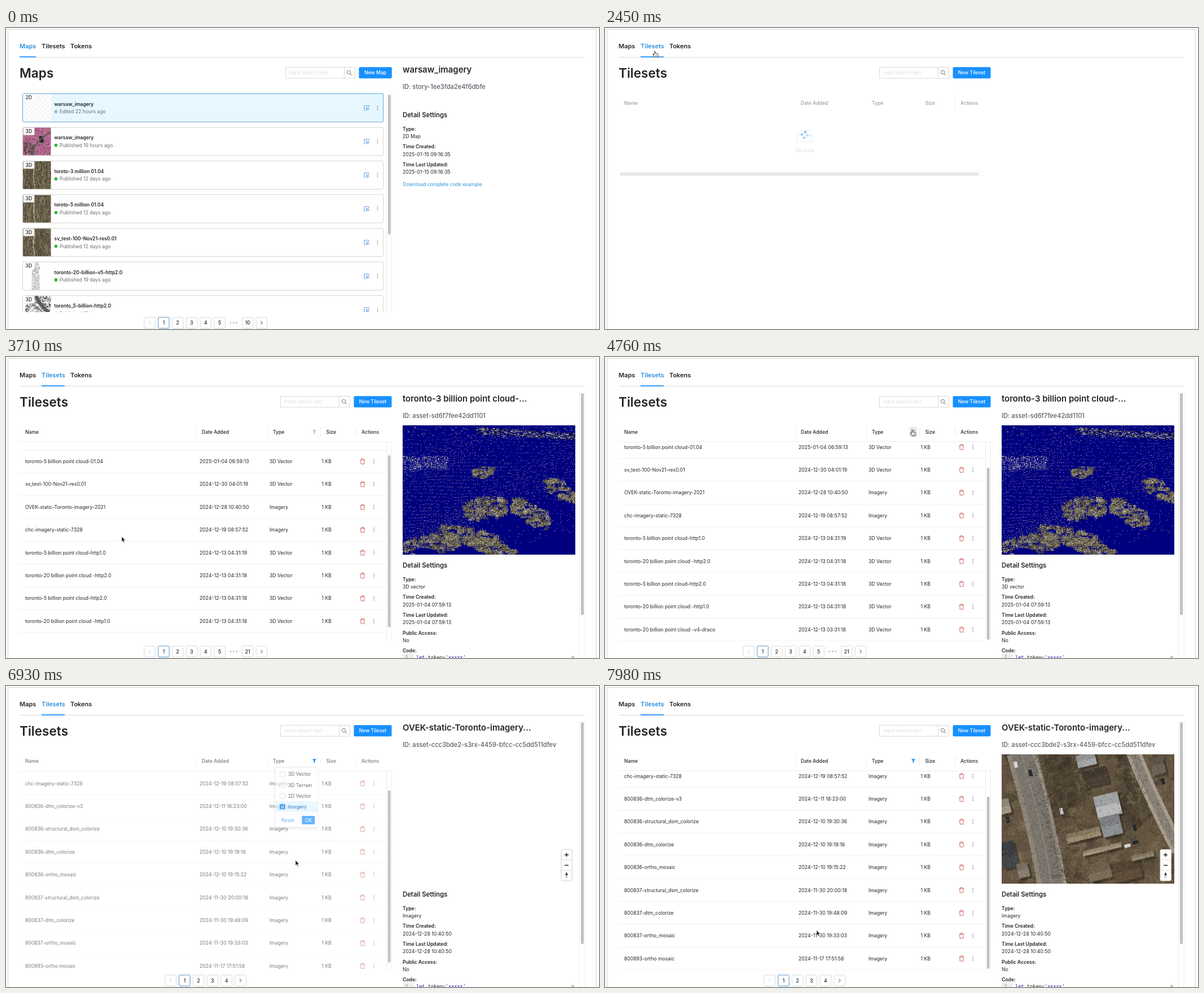
An HTML page with a canvas that plays this animation: 1051x533 px, repeating every 8 s.

```html
<!DOCTYPE html>
<html lang="en">
<head>
<meta charset="utf-8">
<title>Tilesets</title>
<style>
html, body { margin: 0; width: 1051px; height: 533px; overflow: hidden; background: #fff; }
canvas, svg { position: absolute; left: 0; top: 0; }
text { font-family: Inter, Roboto, sans-serif; white-space: pre; }
.mono { font-family: "DejaVu Sans Mono", "Noto Sans Mono", monospace; }
</style>
</head>
<body>
<canvas id="thumbs" width="90" height="503"></canvas>
<canvas id="cloud" width="306" height="229" style="left:703px;top:121px"></canvas>
<canvas id="aerial" width="306" height="229" style="left:703px;top:121px"></canvas>
<svg id="stage" width="1051" height="533" viewBox="0 0 1051 533"></svg>
<script>
const LOOP = 8000, STEP = 70;
const BLUE = '#1890ff', INK = '#242424', LINE = '#d9d9d9', FAINT = '#f0f0f0';
const $ = id => document.getElementById(id);

// ---- SVG helpers; text is placed by its vertical centre ----
const text = (x, y, s, { size = 8.6, weight = 400, fill = INK, anchor = 'start', cls = '' } = {}) =>
  `<text x="${x}" y="${y + size * .364}" font-size="${size}" font-weight="${weight}" fill="${fill}" text-anchor="${anchor}" class="${cls}">${s}</text>`;
const rect = (x, y, w, h, fill, stroke = 'none', r = 0) =>
  `<rect x="${x}" y="${y}" width="${w}" height="${h}" rx="${r}" fill="${fill}" stroke="${stroke}"/>`;
const path = (d, stroke, width = 1, fill = 'none') =>
  `<path d="${d}" stroke="${stroke}" stroke-width="${width}" fill="${fill}"/>`;
const dot = (x, y, r, fill, extra = '') => `<circle cx="${x}" cy="${y}" r="${r}" fill="${fill}" ${extra}/>`;
const group = (id, body) => `<g id="${id}">${body}</g>`;
const medium = { weight: 500 };

const more = (x, y) => [-3, 0, 3].map(d => dot(x, y + d, .75, '#555')).join('');
const trash = (x, y) => path(`M${x - 4.3} ${y - 2.7}h8.6M${x - 1.7} ${y - 3}v-1.6h3.4v1.6M${x - 3.3} ${y - 2.7}l.4 7.2h5.8l.4-7.2`, '#c4443c', .8);

function header(title, button, left, btnX, btnW) {
  return text(24, 79.5, title, { size: 22.6, weight: 600 }) +
    rect(left + .5, 69.5, 104, 19.5, '#fff', LINE) + rect(left + 104.5, 69.5, 19, 19.5, '#fff', LINE) +
    text(left + 7, 79.3, 'input search text', { fill: '#dcdcdc' }) +
    `<circle cx="${left + 112.6}" cy="78.4" r="3.2" fill="none" stroke="#666" stroke-width=".9"/>` +
    path(`M${left + 115} 80.8l3 3`, '#666', 1) +
    rect(btnX, 69.3, btnW, 20, BLUE, 'none', 1.8) +
    text(btnX + btnW / 2, 79.3, button, { fill: '#fff', anchor: 'middle', weight: 500 });
}

function pager(x, y, labels) {
  return labels.map((s, i) => {
    const cx = x + i * 24.8;
    if (s === '…') return [-5.5, 0, 5.5].map(d => dot(cx + d, y, 1.4, '#bfbfbf')).join('');
    const arrow = s === '<' || s === '>';
    return rect(cx - 9.7, y - 9.7, 19.4, 19.4, '#fff', s === '1' ? '#5b93c4' : LINE, 1.5) +
      (arrow ? path(s === '<' ? `M${cx + 1.5} ${y - 3}l-3 3 3 3` : `M${cx - 1.5} ${y - 3}l3 3-3 3`, s === '<' ? '#c4c4c4' : '#333')
        : text(cx, y, s, { anchor: 'middle', weight: 500, size: 8.7 }));
  }).join('');
}

function detail(title, id, top, fields) {
  let out = text(703, 74, title, { size: 14.9, weight: 600 }) +
    text(703, 103.5, 'ID: ' + id, { size: 11.1, weight: 500, fill: '#5a5f69' }) +
    text(703, top, 'Detail Settings', { size: 11.3, weight: 600 });
  fields.forEach(([label, value], i) => {
    const y = top + 25 + i * 31.7;
    out += text(703, y, label + ':', { weight: 600 }) + text(703, y + 13.3, value, { size: 8.7 });
  });
  return out;
}

function assetDetail(title, id, type, time) {
  return detail(title, id, 368.5, [['Type', type], ['Time Created', time], ['Time Last Updated', time], ['Public Access', 'No']]) +
    text(703, 520, 'Code:', { weight: 600 }) + rect(703, 526, 20, 8, '#eee') +
    text(708, 532, '1', { size: 8, fill: '#888', cls: 'mono' }) +
    `<text class="mono" x="727" y="535" font-size="8.6" fill="#222"><tspan fill="#1a1aa8">let</tspan> token=<tspan fill="#1a1aa8">'xxxxx'</tspan></text>` +
    dot(1004.5, 531.5, 2.6, '#c4c4c4') +
    path('M1016.5 62V533M1026 62V533', '#ececec') + rect(1019, 64, 5, 393, '#c1c1c1', 'none', 2.5);
}

// ---- maps page ----
const MAPS = [
  ['warsaw_imagery', 'Edited 22 hours ago'], ['warsaw_imagery', 'Published 19 hours ago'],
  ['toroto-3 million 01.04', 'Published 12 days ago'], ['toroto-5 million 01.04', 'Published 12 days ago'],
  ['sv_test-100-Nov21-res0.01', 'Published 12 days ago'], ['toronto-20-billion-v5-http2.0', 'Published 19 days ago'],
  ['toronto_5-billion-http2.0', 'Published 19 days ago']];
const mapRow = ([name, status], i) => {
  const y = 116 + i * 59.6, first = !i;
  return (first ? rect(80, y, 589, 50, '#e6f7ff') : '') +
    rect(29.5, y + .3, 639.3, 50, 'none', first ? '#5aa5d8' : '#d3d3d3', 2) +
    rect(30.5, y + 1, 20, 13, '#fffffff0') + text(34.5, y + 7.3, first ? '2D' : '3D', medium) +
    text(85.5, y + 18.5, name, { weight: 600, size: 8.5 }) + dot(88.5, y + 32, 2.9, first ? '#a3b6c4' : '#35b83c') +
    text(95, y + 32, status, { fill: '#686c73', size: 8.6 }) +
    path(`M643 ${y + 24}v-2.5h-8v8h2.8M638.3 ${y + 24.5}l5 1.8-2.1 1 2 2.2M638.3 ${y + 24.5}l1.6 5 1.2-2.2`, '#4a90d9', .9) +
    more(658.5, y + 25.3);
};
const mapsPage = header('Maps', 'New Map', 495, 625.5, 58.3) +
  `<g clip-path="url(#mapClip)">${MAPS.map(mapRow).join('')}</g>` +
  path('M674.5 116V503M683.5 116V503', '#ececec') + rect(677, 118, 4.8, 248, '#c1c1c1', 'none', 2.4) +
  pager(254.7, 522, ['<', '1', '2', '3', '4', '5', '…', '10', '>']) +
  detail('warsaw_imagery', 'story-1ee3fda2e4f6dbfe', 153.5,
    [['Type', '2D Map'], ['Time Created', '2025-01-15 09:16:35'], ['Time Last Updated', '2025-01-15 09:16:35']]) +
  text(703.5, 277, 'Download complete code example', { fill: '#2b95dc', size: 8.6 });

// ---- tilesets page ----
const T = 'toronto-', P = ' billion point cloud';
const ALL = [
  [`${T}3${P}-01.04`, '2025-01-04 07:59:13'], [`${T}5${P}-01.04`, '2025-01-04 06:59:13'],
  ['sv_test-100-Nov21-res0.01', '2024-12-30 04:01:19'], ['OVEK-static-Toronto-imagery-2021', '2024-12-28 10:40:50', 1],
  ['chc-imagery-static-7328', '2024-12-19 08:57:52', 1], [`${T}5${P}-http1.0`, '2024-12-13 04:31:19'],
  [`${T}20${P} -http2.0`, '2024-12-13 04:31:18'], [`${T}5${P}-http2.0`, '2024-12-13 04:31:18'],
  [`${T}20${P} -http1.0`, '2024-12-13 04:31:18'], [`${T}20${P} -v4-draco`, '2024-12-13 03:31:18']];
const IMAGERY = [ALL[3], ALL[4],
  ['800836-dtm_colorize-v3', '2024-12-11 18:23:00', 1], ['800836-structural_dsm_colorize', '2024-12-10 19:30:36', 1],
  ['800836-dtm_colorize', '2024-12-10 19:19:16', 1], ['800836-ortho_mosaic', '2024-12-10 19:15:22', 1],
  ['800837-structural_dsm_colorize', '2024-11-30 20:00:18', 1], ['800837-dtm_colorize', '2024-11-30 19:48:09', 1],
  ['800837-ortho_mosaic', '2024-11-30 19:33:03', 1], ['800893-ortho mosaic', '2024-11-17 17:51:58', 1]];
const tableRow = ([name, date, imagery], i) => {
  const y = 170 + i * 40.4;
  return text(34, y, name) + text(343, y, date, { size: 8.75 }) + text(467, y, imagery ? 'Imagery' : '3D Vector') +
    text(559.5, y, '1 KB') + trash(632, y) + more(652, y) + path(`M24 ${y + 20.2}H673`, FAINT);
};
const columns = [[34, 'Name'], [347, 'Date Added'], [473, 'Type'], [567.5, 'Size'], [630, 'Actions']]
  .map(([x, s]) => text(x, 132.8, s, medium)).join('');
const tilesHead = columns + path('M337.5 125v16M463.5 125v16M557.5 125v16M620.5 125v16M24 150H684', '#ececec');
const loading = `<g opacity=".45">${columns}</g>` + path('M620 117v31M24 253.8H671', '#f2f2f2') +
  path('M340.5 190l4-8.5h18l5 8.5v11.5h-27zM340.5 190h8l2 4h7l2-4h8', '#ececec') +
  text(354, 216.5, 'No Data', { fill: '#dedede', anchor: 'middle' }) +
  rect(26, 256, 636.5, 5.6, '#e6e6e6', 'none', 2.8) +
  group('spin', [.9, .5, .65, .75].map((o, i) => dot(i % 2 ? 0 : (i - 1) * 5, i % 2 ? (i - 2) * 5 : 0, 2.3, '#79b8ee', `opacity="${o}"`)).join(''));

const options = ['3D Vector', '3D Terrain', '2D Vector', 'Imagery'];
const dropdown = rect(474, 142, 81, 114, '#00000009', 'none', 5) + rect(476, 143, 77, 110, '#0000000b', 'none', 4) +
  rect(477.5, 145, 75, 104, '#fff', 'none', 2) +
  group('chosen', rect(477.5, 204, 75, 19, '#e0f4ff')) +
  options.map((s, i) => rect(485.5, 151.7 + i * 19.2, 9, 9, '#fff', LINE, 1.5) + text(500, 156.2 + i * 19.2, s)).join('') +
  group('checked', rect(485, 208.8, 10, 10, BLUE, 'none', 1.5) + path('M487.5 213.7l2 2 3.3-4', '#fff', 1.2) +
    text(500, 213.8, 'Imagery', { fill: BLUE })) +
  path('M477 227H552', FAINT) + text(488, 237.6, 'Reset', { fill: BLUE }) +
  rect(524.5, 230, 22.8, 15, BLUE, 'none', 1) + text(536, 237.6, 'OK', { fill: '#fff', anchor: 'middle' });

const controls = rect(984, 289.5, 19.4, 55.5, '#fff', '#cfcfcf', 2.5) + path('M984 308H1003M984 326.5H1003', '#ddd') +
  path('M990 299h7M993.5 295.5v7M990 317.5h7', '#222', 1.5) +
  path('M991 335l2.5-5.5 2.5 5.5z', 'none', 0, '#333') + path('M991 336l2.5 5 2.5-5z', 'none', 0, '#bbb');

$('stage').innerHTML = `<defs>
  <clipPath id="mapClip"><rect x="24" y="110" width="660" height="393"/></clipPath>
  <clipPath id="tableClip"><rect x="24" y="150" width="650" height="353"/></clipPath></defs>` +
  rect(3.5, 2.5, 1042.5, 540, 'none', '#d4d4d4') + path('M24 51.8H1026', LINE) +
  [[24, 'Maps'], [63, 'Tilesets'], [114, 'Tokens']].map(([x, s], i) => group('tab' + i, text(x, 32, s, { size: 11, weight: 600, fill: 'currentColor' }))).join('') +
  group('ink', rect(0, 50.3, 1, 1.7, BLUE)) +
  group('maps', mapsPage) +
  group('tiles', header('Tilesets', 'New Tileset', 486, 616.5, 67) +
    group('loading', loading) +
    group('loaded',
      group('table', tilesHead + `<g clip-path="url(#tableClip)">${group('all', ALL.map(tableRow).join(''))}${group('imagery', IMAGERY.map(tableRow).join(''))}</g>`) +
      path('M674.5 150V503M683.5 150V503', '#ececec') +
      group('thumb', rect(676.8, 152, 4.8, 305, '#c1c1c1', 'none', 2.4)) +
      group('funnelBg', rect(540, 124, 12.8, 18, '#e6e6e6', 'none', 1)) +
      group('funnel', '<path d="M543 129.3h7l-2.5 3.3v3.4h-2v-3.4z" fill="currentColor"/>') +
      group('allSide', pager(254.7, 521.5, ['<', '1', '2', '3', '4', '5', '…', '21', '>']) +
        assetDetail('toronto-3 billion point cloud-...', 'asset-sd6f7fee42dd1101', '3D vector', '2025-01-04 07:59:13')) +
      group('imagerySide', pager(291.7, 521.5, ['<', '1', '2', '3', '4', '>']) + controls +
        assetDetail('OVEK-static-Toronto-imagery...', 'asset-ccc3bde2-s3rx-4459-bfcc-cc5dd511dfev', 'Imagery', '2024-12-28 10:40:50')) +
      group('dropdown', dropdown))) +
  group('cursor',
    group('arrow', path('M0 0V9.4L2.2 7.4 3.8 10.8 5.3 10.1 3.7 6.8H6.6Z', '#fff', .7, '#111')) +
    group('hand', path('M-1.2.8Q0-.8 1 .8V4L5 4.8Q6 5.2 5.6 7.5L4.4 10.5H-.6Q-3 8-3.6 5.6Q-2.6 5-1.2 6.4Z', '#222', .9, '#fff') +
      path('M1.2 7v2M2.9 7v2', '#333', .6)));

// ---- pictures ----
function seeded(seed) {
  return () => {
    seed = seed + 0x6D2B79F5 | 0;
    let n = Math.imul(seed ^ seed >>> 15, 1 | seed);
    n ^= n + Math.imul(n ^ n >>> 7, 61 | n);
    return ((n ^ n >>> 14) >>> 0) / 4294967296;
  };
}
const pick = (list, r) => list[r() * list.length | 0];
function scatter(c, r, n, x, y, w, h, colors, size = 1) {
  for (let i = 0; i < n; i++) {
    c.fillStyle = pick(colors, r);
    const s = size * (.5 + r());
    c.fillRect(x + r() * w, y + r() * h, s, s);
  }
}
function block(c, x, y, w, h, angle, fill) {
  c.save(); c.translate(x, y); c.rotate(angle);
  c.fillStyle = fill; c.fillRect(-w / 2, -h / 2, w, h);
  c.restore();
}
function curve(c, color, width, x0, y0, x1, y1, x2, y2) {
  c.strokeStyle = color; c.lineWidth = width;
  c.beginPath(); c.moveTo(x0, y0); c.quadraticCurveTo(x1, y1, x2, y2); c.stroke();
}
function blotches(c, r, n, x, y, w, h, size, colors) {
  for (let i = 0; i < n; i++) {
    c.fillStyle = pick(colors, r);
    c.beginPath();
    c.ellipse(x + r() * w, y + r() * h, size * (.3 + r()), size * (.2 + r() * .6), r() * 3, 0, 7);
    c.fill();
  }
}

function drawThumbs() {
  const c = $('thumbs').getContext('2d'), r = seeded(5);
  for (let i = 0; i < 7; i++) {
    const y = 116.5 + i * 59.6;
    c.save(); c.beginPath(); c.rect(30, y, 49.5, 49.5); c.clip(); c.translate(30, y);
    if (i === 0) {
      c.fillStyle = '#f5f5f5';
      for (let k = 0; k < 144; k++) if ((k + (k / 12 | 0)) % 2) c.fillRect(k % 12 * 4.2, (k / 12 | 0) * 4.2, 4.2, 4.2);
    } else if (i === 1) {
      c.fillStyle = '#b3678f'; c.fillRect(0, 0, 50, 50);
      scatter(c, r, 350, 0, 0, 50, 50, ['#8d4f70', '#c985a8', '#6f4a5c', '#a05a82'], 1.6);
      scatter(c, r, 45, 0, 26, 20, 24, ['#4a4f40', '#5b5048'], 2.6);
      scatter(c, r, 18, 28, 15, 6, 9, ['#1e2a1e'], 3);
      curve(c, '#55624c', 2.5, 17, 50, 18, 25, 50, 8);
    } else if (i < 5) {
      c.fillStyle = '#685d47'; c.fillRect(0, 0, 50, 50);
      for (let k = 0; k < 80; k++) {
        const x = r() * 50, v = r() * 50;
        curve(c, pick(['#4a4538', '#8b7d60', '#3d4035', '#9a8b6c'], r), .8, x, v, x + r() * 8 - 4, v + 6, x + r() * 8 - 4, v + 14);
      }
      curve(c, '#c3bcab', 1.5, 20, 14, 17, 32, 22, 50);
      scatter(c, r, 250, 0, 0, 50, 50, ['#2f332a', '#a49674', '#57503f'], 1.2);
    } else if (i === 5) {
      c.fillStyle = '#dedede'; c.beginPath();
      c.moveTo(20, 0); c.lineTo(28, 0); c.lineTo(30, 50); c.lineTo(15, 50); c.lineTo(16, 14); c.fill();
      scatter(c, r, 230, 16, 2, 13, 48, ['#777', '#aaa', '#fff'], 1);
    } else {
      scatter(c, r, 380, 3, 0, 47, 30, ['#777', '#aaa', '#555', '#ccc'], 2);
      curve(c, '#5b5b55', 6, 24, 0, 26, 12, 46, 30);
    }
    c.restore();
  }
}

function drawCloud() {
  const c = $('cloud').getContext('2d'), r = seeded(21);
  const pale = ['#d8d8c8', '#a8a896', '#8d8d8a', '#6666a0'];
  const solid = ['#8c8468', '#575039', '#a39b7e', '#2d2a20', '#6d6650', '#454030', '#d0cab6'];
  c.fillStyle = '#00007f'; c.fillRect(0, 0, 306, 229);
  // scan lines sweep across, densest on the left
  for (let k = 0; k < 40; k++) for (let x = 0; x < 306; x += 2) {
    const y = 24 + k * 5 + Math.sin(x / 45 + k * .25) * 6 - x * .09;
    const keep = y < 60 ? .42 : x < 125 ? .65 : y < 130 ? .42 : .13;
    if (r() < keep) { c.fillStyle = pick(pale, r); c.fillRect(x + r() * 2, y + r() * 3, 1, 1); }
  }
  scatter(c, r, 550, 0, 54, 80, 24, pale);
  scatter(c, r, 260, 0, 2, 306, 20, pale, .9);
  for (let k = 0; k < 650; k++) {
    const x = 130 + r() * 176;
    c.fillStyle = pick(['#0c0c22', '#77776c', '#c8c8b8', '#1d1d38'], r);
    c.fillRect(x, 3 + (x - 130) * .06 + r() * 12, 2.5, 1);
  }
  // ragged clumps: many small tufts of points
  const clump = (x, y, w, h, tilt, tufts) => {
    for (let k = 0; k < tufts; k++) {
      const u = (r() * 2 - 1) * w, v = (r() * 2 - 1) * h * (1 - .5 * (u / w) ** 2);
      const shade = pick(solid, r), tw = 5 + r() * 9, th = 3 + r() * 6;
      for (let j = 0; j < 34; j++) {
        c.fillStyle = j % 3 ? pick(solid, r) : shade;
        c.fillRect(x + u + (r() - .5) * tw, y + v + u * tilt + (r() - .5) * th, 1.2, 1.2);
      }
    }
  };
  clump(143, 82, 17, 10, -.12, 30);
  clump(280, 115, 26, 17, .5, 62);
  clump(146, 147, 36, 20, -.1, 105);
  clump(226, 155, 33, 20, .45, 95);
  clump(50, 211, 50, 18, -.15, 110);
  clump(118, 196, 52, 15, .2, 120);
  clump(160, 217, 40, 12, .25, 80);
  c.fillStyle = '#00007f';
  c.beginPath(); c.ellipse(44, 228, 24, 10, .2, 0, 7); c.fill();
}

function drawAerial() {
  const c = $('aerial').getContext('2d'), r = seeded(8), tilt = -.24;
  c.fillStyle = '#62543f'; c.fillRect(0, 0, 306, 229);
  blotches(c, r, 260, 0, 0, 306, 229, 13, ['#54473655', '#7d6d5455', '#42382c66', '#8c7c6444']);
  blotches(c, r, 70, 80, 0, 55, 110, 13, ['#3b322888', '#4a3f3188', '#5a4d3a88']);
  blotches(c, r, 40, 205, 0, 35, 130, 10, ['#3b322888', '#4f443688']);
  curve(c, '#8f8678', 52, 34, -5, 71, 120, 90, 235);
  curve(c, '#7b766e', 36, 34, -5, 71, 120, 90, 235);
  curve(c, '#a09a8f', 3, 56, -5, 95, 120, 114, 235);
  curve(c, '#a0967f', 1, 34, -5, 71, 120, 90, 235);
  curve(c, '#a89d8e', 26, 233, -5, 262, 70, 314, 170);
  curve(c, '#8a8276', 14, 233, -5, 262, 70, 314, 170);
  // buildings and yards; the far half of each is in shade
  [[150, 10, 34, 22, '#a7a8a8'], [166, 40, 44, 30, '#4a4035'], [188, 90, 44, 40, '#b9bbbd'],
    [194, 126, 36, 36, '#8f9295'], [145, 143, 62, 16, '#9c8c72'], [178, 168, 70, 9, '#a6967e'],
    [222, 206, 50, 34, '#5f4d3a'], [174, 208, 40, 28, '#7d6d56'], [12, 178, 28, 46, '#43464a'],
    [38, 205, 20, 26, '#8a806f'], [6, 92, 18, 26, '#a19886'], [277, 20, 24, 30, '#6d6256'], [250, 180, 40, 10, '#95866d']]
    .forEach(([x, y, w, h, fill]) => {
      block(c, x + 4, y + 4, w, h, tilt, '#231e1977');
      block(c, x, y, w, h, tilt, fill);
      block(c, x - h * .06, y - h * .25, w, h / 2, tilt, '#0000001f');
    });
  [[25, 18], [51, 33], [11, 116], [106, 101], [236, 130], [237, 156], [223, 162], [286, 48]].forEach(([x, y], i) =>
    block(c, x, y, 6, 11, i > 4 && i < 7 ? 1.3 : tilt, i % 3 ? '#24282d' : '#d9dad8'));
  // bare branches along both road verges
  const branches = (n, left, spread, lean) => {
    for (let k = 0; k < n; k++) {
      const y = r() * 229, x = left + y * lean + r() * spread, a = r() * 6.3;
      curve(c, '#332b2277', .8, x, y, x + 4, y + 3, x + Math.cos(a) * 17, y + Math.sin(a) * 17);
    }
  };
  branches(130, 78, 60, .12);
  branches(110, 52, 24, .22);
  branches(60, 195, 50, .2);
  scatter(c, r, 6500, 0, 0, 306, 229, ['#00000020', '#ffffff16', '#2c221628'], 1.7);
}
drawThumbs(); drawCloud(); drawAerial();

// ---- timeline ----
const clamp = v => Math.max(0, Math.min(1, v));
const ramp = (t, a, b) => clamp((t - a) / (b - a));
const ease = p => p < .5 ? 4 * p ** 3 : 1 - (2 - 2 * p) ** 3 / 2;
const between = (t, a, b) => t >= a && t < b;
const show = (id, on) => $(id).style.display = on ? '' : 'none';

const PATH = [[560, 489, 524], [1050, 156, 238], [1260, 156, 238], [1820, 88, 13], [1960, 88, 13], [2170, 88.5, 41], [2590, 88.5, 41],
  [2730, 150, 110], [3080, 198, 287], [3290, 205, 318], [4200, 205, 318], [4690, 545, 129], [5460, 545, 129], [5880, 512, 158],
  [6230, 508, 211], [6370, 508, 211], [6510, 536, 236], [6580, 536, 236], [6720, 514, 296], [6930, 513, 308.5], [7280, 463, 387.5],
  [7560, 378, 430], [7980, 375, 432.5]];
function cursorAt(t) {
  const i = PATH.findIndex(k => k[0] > t);
  if (i < 0) return PATH[PATH.length - 1].slice(1);
  if (!i) return PATH[0].slice(1);
  const [t0, x0, y0] = PATH[i - 1], [t1, x1, y1] = PATH[i], p = ramp(t, t0, t1), s = p * p * (3 - 2 * p);
  return [x0 + (x1 - x0) * s, y0 + (y1 - y0) * s];
}

function render(t) {
  const onTiles = t >= 2170, loaded = t >= 2590, filtered = t >= 6790;
  const slide = 1 - (1 - ramp(t, 2100, 2400)) ** 3;
  $('ink').setAttribute('transform', `translate(${24 + 39 * slide} 0) scale(${29 + 12 * slide} 1)`);
  $('tab0').style.color = onTiles ? INK : '#2b8fe0';
  $('tab1').style.color = onTiles ? '#2b8fe0' : between(t, 1680, 2170) ? '#40a9ff' : INK;
  $('tab2').style.color = INK;
  show('maps', !onTiles); show('thumbs', !onTiles);
  show('tiles', onTiles); show('loading', !loaded); show('loaded', loaded);
  $('spin').setAttribute('transform', `translate(354 189.3) rotate(${(t - 2450) * .3 + 100})`);

  const scroll = 51 * (t < 6000 ? ease(ramp(t, 3430, 3990)) : t < 7400 ? 1 - ease(ramp(t, 6750, 7200)) : ease(ramp(t, 7560, 7910)));
  ['all', 'imagery'].forEach(id => $(id).setAttribute('transform', `translate(0 ${-scroll})`));
  $('thumb').setAttribute('transform', `translate(0 ${scroll * 44 / 51})`);
  show('all', !filtered); show('allSide', !filtered);
  show('imagery', filtered); show('imagerySide', filtered);
  $('table').setAttribute('opacity', t < 3000 ? .5 + .5 * ramp(t, 2590, 2800)
    : t < 7000 ? 1 - .4 * ramp(t, 6650, 6860) : .6 + .4 * ramp(t, 7000, 7210));
  $('funnel').style.color = filtered ? BLUE : '#bfbfbf';
  show('funnelBg', between(t, 4620, 5530));

  show('cloud', between(t, 2800, 6790));
  $('aerial').style.opacity = ramp(t, 7000, 7350);

  show('dropdown', between(t, 5180, 7070));
  $('dropdown').setAttribute('opacity', t < 6000 ? ramp(t, 5110, 5390) : 1 - ramp(t, 6860, 7070));
  show('chosen', t >= 6300); show('checked', t >= 6300);

  const hand = between(t, 1680, 2660) || between(t, 4620, 5530) || between(t, 5810, 6650);
  show('cursor', t >= 560); show('hand', hand); show('arrow', !hand);
  $('cursor').setAttribute('transform', `translate(${cursorAt(t)})`);
}

const start = performance.now();
function tick() {
  const t = (performance.now() - start) % LOOP;
  render(Math.floor(t / STEP) * STEP);
  requestAnimationFrame(tick);
}
tick();
</script>
</body>
</html>
```
